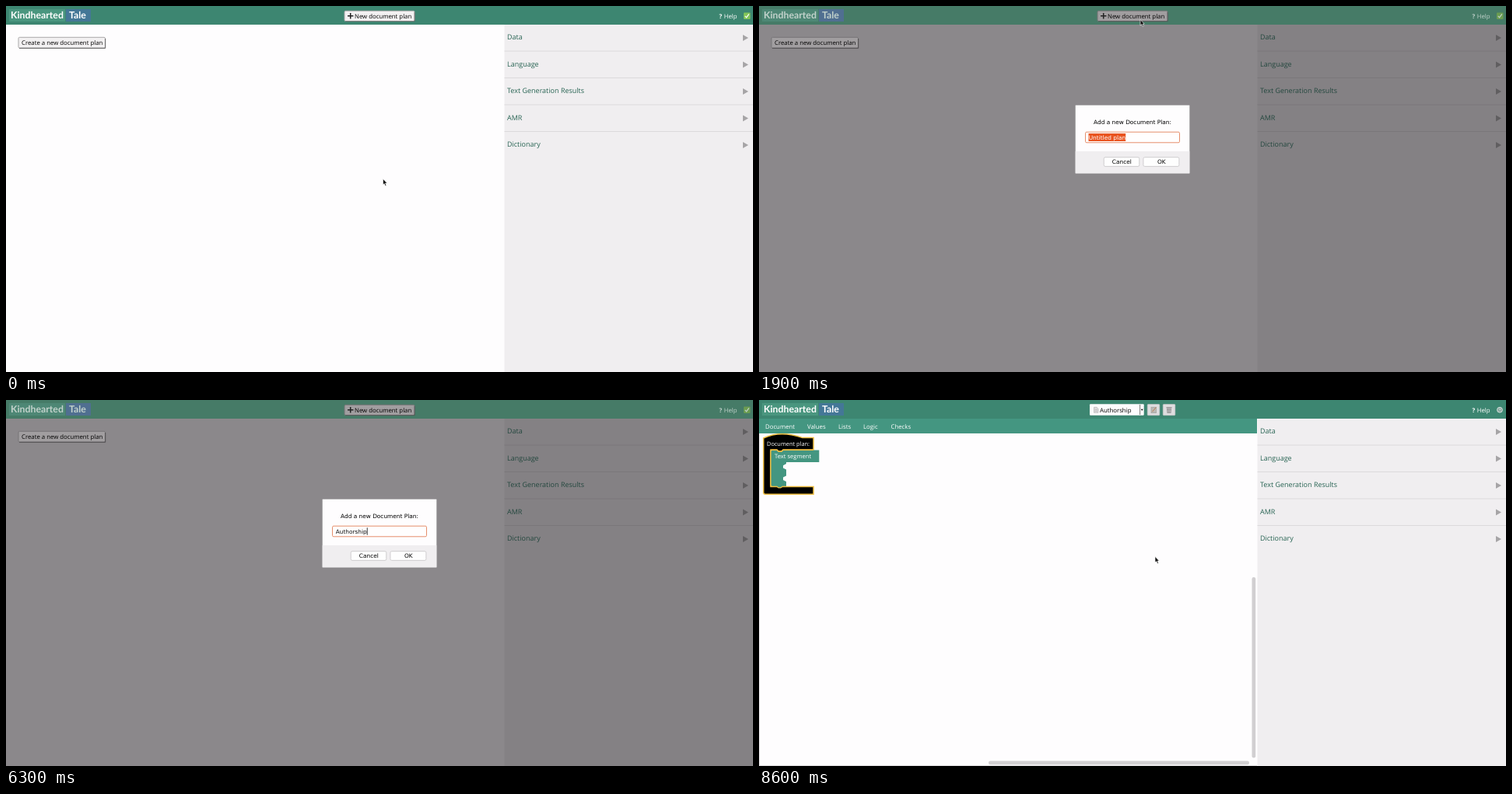
An HTML page that plays this animation: 960 by 471 pixels, repeating every 9000 ms.

```html
<!DOCTYPE html>
<html lang="en">
<head>
<meta charset="utf-8">
<title>New document plan</title>
<style>
  html, body { margin: 0; width: 100%; height: 100%; overflow: hidden; background: #fefdfe; }
  svg {
    display: block; width: 100vw; height: 100vh;
    font: 7.8px "Open Sans", "Noto Sans", sans-serif;
    text-rendering: geometricPrecision;
    --page: #fefdfe; --panel: #f0eef0; --line: #dcdadc; --head: #3d8671; --ink: #286453;
    --mark: #a6a4a6; --light: #fff; --button: #f3f1f2; --edge: #aaa8a9; --shade: #666465;
    --brand: #4a967f; --brand2: #447797; --tick: #82c458;
  }
  svg.dim {
    --page: #8b888b; --panel: #848184; --line: #7a777a; --head: #467b67; --ink: #24483f;
    --mark: #605e60; --light: #c2d2cb; --button: #a19ea0; --edge: #777577; --shade: #504e50;
    --brand: #4e8775; --brand2: #506f91; --tick: #6b9c51;
  }
  .page { fill: var(--page); }
  .panel { fill: var(--panel); }
  .head { fill: var(--head); }
  .light { fill: var(--light); }
  .brand { font: 700 12.3px Lato, sans-serif; }
  .rows text { font-size: 9px; fill: var(--ink); }
  .rows path { fill: var(--mark); }
  .rows line { stroke: var(--line); }
  .button rect { fill: var(--button); stroke: var(--edge); }
  .button path { fill: none; stroke: var(--shade); }
  .button.pressed rect { stroke: #555; stroke-width: 1.6; }
  .dialog { font: 7.38px "DejaVu Sans", Verdana, sans-serif; }
  .dialog .choice { fill: #fefefe; stroke: #cfcdcf; }
  .middle { text-anchor: middle; }
  .tools text { fill: #fff; }
</style>
</head>
<body>
<svg id="stage" viewBox="0 0 960 471" preserveAspectRatio="none">
  <rect class="page" width="960" height="471"/>
  <rect class="panel" x="640.5" y="24" width="320" height="447"/>
  <g class="rows" id="rows"></g>

  <g id="welcome">
    <g class="button">
      <rect x="16" y="40.3" width="111.5" height="13.8" rx="1.5"/>
      <path d="M17 54.3H127.7V42"/>
      <text x="20" y="49.9">Create a new document plan</text>
    </g>
  </g>

  <rect class="head" width="960" height="24"/>
  <rect x="4" y="4" width="72" height="16" fill="var(--brand)"/>
  <rect x="77" y="4" width="32" height="16" fill="var(--brand2)"/>
  <g class="brand light">
    <text x="6" y="16.3">Kindhearted</text>
    <text x="81" y="16.3">Tale</text>
  </g>
  <text class="light" x="916.5" y="15.6" font-weight="700">?</text>
  <text class="light" x="922.7" y="15.6">Help</text>
  <g id="saved">
    <rect x="948" y="8.5" width="8.5" height="8.5" rx="1" fill="var(--tick)"/>
    <path d="M949.8 12.8l1.8 2 3.2-4.4" fill="none" stroke="var(--light)" stroke-width="1.2"/>
  </g>
  <g id="saving" fill="none" stroke="#d5e2df">
    <circle cx="952" cy="12.7" r="3.4" fill="#8da9a1"/>
    <path d="M952 10.7v2l1.4-1" stroke-width=".8"/>
  </g>

  <g class="button" id="add">
    <rect x="435" y="6.3" width="90" height="13.2" rx="1.5"/>
    <path d="M436 19.7H525.2V8" stroke-width=".7"/>
    <path d="M439 12.7h7.4M442.7 9v7.4" style="stroke:#222" stroke-width="1.5"/>
    <text x="448" y="15.5">New document plan</text>
  </g>

  <g id="picker">
    <rect x="425" y="5.3" width="69.7" height="14.5" rx="1" fill="#fdfcfd"/>
    <path d="M430.5 9.3h3.6l1.9 2v5h-5.5z" fill="#dedcde" stroke="#aaa" stroke-width=".6"/>
    <path d="M431.7 12.3h3m-3 2h3" stroke="#aaa" stroke-width=".6"/>
    <text x="438" y="15.5">Authorship</text>
    <path d="M489.6 6v13" stroke="#777"/>
    <path d="M490.7 11.7h3l-1.5 2z"/>
    <g fill="#dfdddf" stroke="#c5c3c5" stroke-width=".6">
      <rect x="499.2" y="5.5" width="15.6" height="14.2" rx="1"/>
      <rect x="519.2" y="5.5" width="15.6" height="14.2" rx="1"/>
    </g>
    <rect x="504" y="9.2" width="6.5" height="7.5" fill="#bbb9b5" stroke="#9b9995" stroke-width=".6"/>
    <path d="M505.5 15l4.8-5.6" stroke="#bc8156"/>
    <path d="M523.5 9h7v1.5h-7zM524 11h6l-.5 6h-5z" fill="#969496"/>
    <path d="M525.7 11.6v4.6m1.4-4.6v4.6m1.4-4.6v4.6" stroke="#d7d5d7" stroke-width=".5"/>
  </g>

  <g id="workspace">
    <g class="tools">
      <rect y="24" width="640" height="19" fill="#449681"/>
      <text x="8" y="36.5">Document</text>
      <text x="62" y="36.5">Values</text>
      <text x="102" y="36.5">Lists</text>
      <text x="134" y="36.5">Logic</text>
      <text x="169.5" y="36.5">Checks</text>
    </g>
    <path d="M.5 43V470.5H640" fill="none" stroke="#dddbdd"/>
    <g fill="#d1cfd1">
      <rect x="633.5" y="228" width="4.7" height="232.5" rx="2.3"/>
      <rect x="295" y="464.5" width="335" height="4.7" rx="2.3"/>
    </g>
  </g>
  <g id="blocks">
    <path d="M5.8 49Q28 38.5 56 48.6H70V64H31l-2 2h-4l-2-2H15V111.5H70V121.2H8q-2.2 0-2.2-2.2z"
          stroke="#f0c044" stroke-width="1.5"/>
    <path d="M15 66q0-1.5 1.5-1.5H23l2 2h4l2-2H77.3V80H35v2l-4 2.2v3.3l4 2v8l-4 2v3.4l4 2v6.6H30l-2 1.6h-3l-2-1.6h-6q-2 0-2-2z"
          fill="#449681"/>
    <path d="M70 64.3H31l-2 2h-4l-2-2h-6q-2 0-2 2V109q0 2.3 2 2.3h6l2 1.6h3l2-1.6h5"
          fill="none" stroke="#f0c044" stroke-width="1.3"/>
    <g fill="#fff">
      <text x="10" y="58.6" font-size="7.4">Document plan:</text>
      <text x="20" y="74.8" font-size="7.6">Text segment</text>
    </g>
  </g>

  <g class="dialog" id="dialog">
    <rect x="406.7" y="127.7" width="146.6" height="87.6" fill="#fefdfe"/>
    <rect x="406.7" y="187" width="146.6" height="28.3" fill="#f0eef0"/>
    <text class="middle" x="480" y="152">Add a new Document Plan:</text>
    <rect x="419.5" y="162.2" width="121" height="13.6" rx="1.5" fill="#fffefe" stroke="#e58e6b"/>
    <rect id="selection" x="423.5" y="164" width="47.7" height="10" fill="#e95420"/>
    <text id="entry" x="423.7" y="171.6"></text>
    <rect id="caret" y="164.3" width=".8" height="9.4"/>
    <rect class="choice" x="443.2" y="194.7" width="45.6" height="11.7" rx="1.8"/>
    <rect class="choice" x="493.9" y="194.7" width="46" height="11.7" rx="1.8"/>
    <text class="middle" x="466.3" y="203.2">Cancel</text>
    <text class="middle" x="517.3" y="203.2">OK</text>
  </g>

  <g id="cursor">
    <path id="arrow" d="M0 0V7.6L1.7 6.1 3 9 4.3 8.4 3.1 5.6H5.3z" fill="#111" stroke="#fff" stroke-width=".6"/>
    <path id="beam" d="M-2-3.7H-.5L0-3.2.5-3.7H2M0-3.2V3.2M-2 3.7H-.5L0 3.2 .5 3.7H2" fill="none" stroke="#333" stroke-width=".9"/>
    <path id="hand" d="M-.6 3.8V-3.3q.8-1.2 1.5 0V-.5L4 .3V2.5L3.1 4.4H-.6L-2.8 1.7q-.2-1.2 1-.6L-.6 1.9z"
          fill="#fff" stroke="#333" stroke-width=".8"/>
  </g>
</svg>
<script>
const LOOP = 9000, STEP = 100;
const el = id => document.getElementById(id);
const show = (id, on) => el(id).style.display = on ? "" : "none";
const between = (t, from, to) => t >= from && t < to;

el("rows").innerHTML = ["Data", "Language", "Text Generation Results", "AMR", "Dictionary"].map((name, i) => {
  const y = 34.5 * i;
  const divider = i < 4 ? `<line x1="640.5" x2="960" y1="${58 + y}" y2="${58 + y}"/>` : "";
  return `<text x="644" y="${43.2 + y}">${name}</text><path d="M947 ${37 + y}v8l7-4z"/>${divider}`;
}).join("");

// Pointer positions: time, x, y
const route = [
  [0, 484.5, 222.5], [600, 484.5, 222.5], [900, 502, 165], [1200, 517, 78], [1400, 504, 31],
  [1600, 489, 15.5], [1800, 489, 15.5], [1900, 490, 17.5], [2100, 492, 55], [2400, 490, 132],
  [2600, 488.5, 150], [3000, 493.7, 167], [7300, 493.7, 167], [7700, 509, 201.5],
  [7900, 509, 201.5], [8000, 510.5, 204.5], [8100, 509, 201.5], [9000, 509, 201.5]
];
const typing = [
  [0, "Untitled plan"], [3400, ""], [4200, "A"], [4500, "Aut"], [5200, "Autho"],
  [5500, "Author"], [5800, "Authorsh"], [6200, "Authorshi"], [6300, "Authorship"]
];

function pointer(t) {
  const i = route.findIndex(([time]) => time > t);
  const [t0, x0, y0] = route[i - 1], [t1, x1, y1] = route[i];
  const k = (t - t0) / (t1 - t0);
  return [x0 + (x1 - x0) * k, y0 + (y1 - y0) * k];
}

function draw(t) {
  const modal = between(t, 1900, 8000), selected = t < 3400;
  el("stage").classList.toggle("dim", modal);
  el("add").classList.toggle("pressed", between(t, 1700, 1900));
  show("dialog", modal);
  show("add", t < 8200);
  show("picker", t >= 8200);
  show("welcome", t < 8300);
  show("workspace", t >= 8300);
  show("blocks", t >= 8400);
  show("saved", t < 8500);
  show("saving", t >= 8500);

  if (modal) {
    const entry = el("entry");
    entry.textContent = typing.findLast(([time]) => time <= t)[1];
    entry.setAttribute("fill", selected ? "#fff" : "#111");
    show("selection", selected);
    show("caret", !selected);
    el("caret").setAttribute("x", 423.7 + entry.getComputedTextLength());
  }

  const [x, y] = pointer(t);
  const beam = modal && between(y, 162, 176), hand = between(t, 8000, 8100);
  el("cursor").setAttribute("transform", `translate(${x} ${y})`);
  show("cursor", !between(t, 5500, 7300));
  show("beam", beam);
  show("hand", hand);
  show("arrow", !beam && !hand);
}

const start = performance.now();
function frame() {
  const t = (performance.now() - start) % LOOP;
  draw(Math.floor(t / STEP) * STEP);
  requestAnimationFrame(frame);
}
frame();
</script>
</body>
</html>
```
